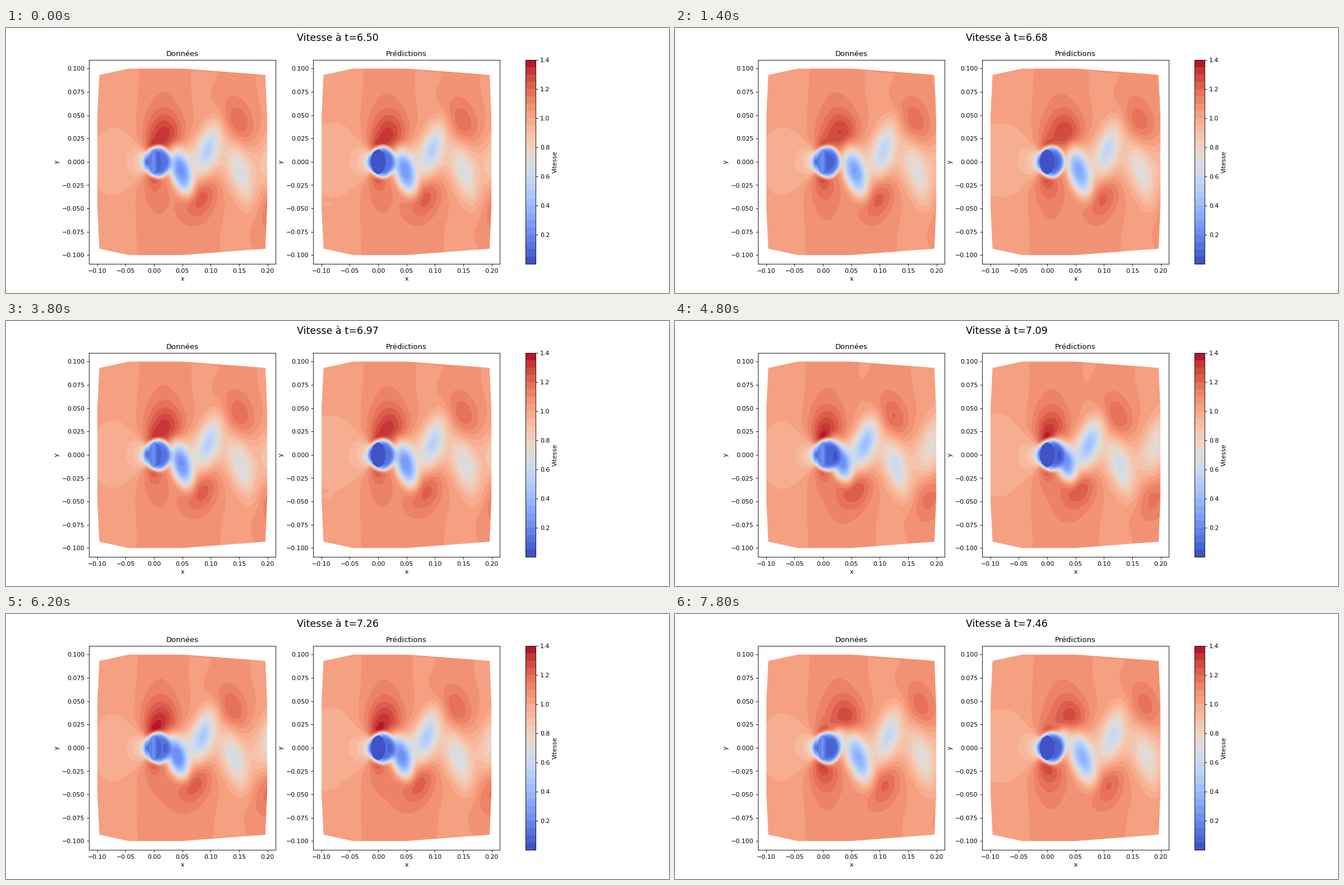
A matplotlib script that plays this animation: 1183 by 473 pixels, repeating every 8 s.

```python
import numpy as np
import matplotlib.pyplot as plt
from matplotlib.animation import FuncAnimation
from matplotlib.patches import Polygon

FRAMES, INTERVAL = 40, 200
DPI = 78.875
T_START, DT = 6.504, 0.0245
HALF = 0.1545 / 2            # half a shedding period
R = 0.0135                   # cylinder radius
LEVELS = np.linspace(0, 1.4, 29)

X, Y = np.meshgrid(np.linspace(-.1, .2, 241), np.linspace(-.1, .1, 201))
RAD = np.hypot(X, Y)


def gauss(d, width):
    return np.exp(-.5 * (d / width) ** 2)


def sigmoid(d):
    return 1 / (1 + np.exp(-np.clip(d, -40, 40)))


def steady_flow():
    """Outer stream bent around the cylinder."""
    r2 = np.maximum(RAD, .016) ** 2
    bend = -R ** 2 / r2 * (X ** 2 - Y ** 2) / np.maximum(RAD, 1e-6) ** 2
    slow = np.minimum(bend, 0) * sigmoid(-X / .004)
    fast = .3 * np.maximum(bend, 0)
    base = 1.015 + .015 * sigmoid((X + .03) / .006)
    return base + slow + fast + .02 * gauss(X - .012, .03)


def mean_wake():
    """Share of the speed left by the body and the mean wake."""
    q = np.hypot((X - .007) / .023, Y / .0165)
    body = 1 - .9 * np.exp(-.7 * q ** 8)
    deficit = .12 + .18 * gauss(X - .047, .018)
    width = .013 + .007 * sigmoid((X - .075) / .012)
    return body * (1 - deficit * sigmoid((X - .035) / .006) * gauss(Y, width))


STEADY, WAKE = steady_flow(), mean_wake()


def fast_spot(age, side):
    """Speed gained beside a vortex, with its faint column to the wall."""
    x = .006 + .83 * .012 * np.logaddexp(0, (age - .061) / .012)
    dy = Y - side * (.019 + .09 * age)
    dx = X - x + side * .4 * sigmoid((age - .11) / .01) * dy
    amp = .26 * sigmoid((age - .03) / .012) * np.exp(-(age / .32) ** 2)
    column = .032 * sigmoid((age + .03) / .015) * gauss(X - x, .032)
    return amp * gauss(dx, .021) * gauss(dy, .019) + column * sigmoid(side * Y / .01)


def slow_core(age, side):
    """Share of the speed lost in a vortex core across the axis."""
    a = max(age, 0)
    rise = sigmoid((age - .028) / .008)
    size = .6 + .4 * rise
    dy = Y + side * .0135 * (1 - np.exp(-(a / .06) ** 2))
    dx = X - (.008 + .45 * a + .75 * a ** 2) + side * .4 * dy
    q2 = (dx / (.0168 * size)) ** 2 + (dy / ((.018 + .035 * a) * size)) ** 2
    power = 1 + .5 * sigmoid((.1 - age) / .01)
    return 1.15 * rise * np.exp(-a / .17) * np.exp(-.7 * q2 ** power)


def speed(tau, predicted):
    v, left = STEADY.copy(), WAKE.copy()
    gain = .97 if predicted else 1
    first = int(np.ceil((tau - .385) / HALF))
    last = int(np.floor((tau + .1) / HALF))
    for n in range(first, last + 1):
        age, side = tau - n * HALF, 1 if n % 2 else -1
        v += gain * fast_spot(age, side)
        left *= 1 - gain * slow_core(age, side)
    v *= left

    inside = RAD < R
    if predicted:
        ripple = .003 * np.sin(300 * Y + 40 * tau) - .014 * gauss(Y, .025)
        v += gauss(X + .1, .035) * ripple
        v[inside] = .02
    else:
        stripes = .09 + .13 * gauss(X + .001, .003) + .05 * gauss(X + .008, .002)
        v[inside] = stripes[inside]
        rim = np.maximum(-X / R + np.abs(Y) / .0138 - 1, 0)
        v += .8 * rim * (inside & (X < 0))
    return np.clip(v, .001, 1.399)


# Upper half of the domain, mirrored for the lower one.
UPPER = [(-.0996, .0505), (-.0962, .0931), (-.0444, .0999),
         (.0493, .0999), (.1963, .0931), (.1994, .047)]
OUTLINE = UPPER + [(x, -y) for x, y in reversed(UPPER)]
SLIVER = [UPPER[3], UPPER[4], (.11, .0955)]

# The small surplus guards against truncation of the pixel size.
fig, axes = plt.subplots(1, 2, figsize=(1183.01 / DPI, 473.01 / DPI), dpi=DPI)
title = fig.suptitle("", fontsize=16)
fills = []


def fill(ax, tau, predicted):
    cs = ax.contourf(X, Y, speed(tau, predicted), levels=LEVELS, cmap="coolwarm")
    cs.set_clip_path(Polygon(OUTLINE, transform=ax.transData))
    return cs


def draw(i):
    while fills:
        fills.pop().remove()
    for k, ax in enumerate(axes):
        fills.append(fill(ax, i * DT, k == 1))
    title.set_text(f"Vitesse à t={T_START + i * DT:.2f}")
    return fills


for ax, name in zip(axes, ("Données", "Prédictions")):
    ax.set(title=name, xlabel="x", ylabel="y",
           xlim=(-.1146, .2144), ylim=(-.10935, .10935))
    ax.set_xticks(np.arange(-2, 5) * .05)
    ax.set_yticks(np.arange(-4, 5) * .025)
    ax.add_patch(Polygon(SLIVER, fc=plt.get_cmap("coolwarm")(.77), lw=0, zorder=2))

draw(0)
fig.colorbar(fills[0], ax=list(axes), ticks=np.arange(1, 8) * .2, label="Vitesse")

anim = FuncAnimation(fig, draw, frames=FRAMES, interval=INTERVAL,
                     init_func=lambda: draw(0), repeat=True, repeat_delay=0)
plt.show()
```
